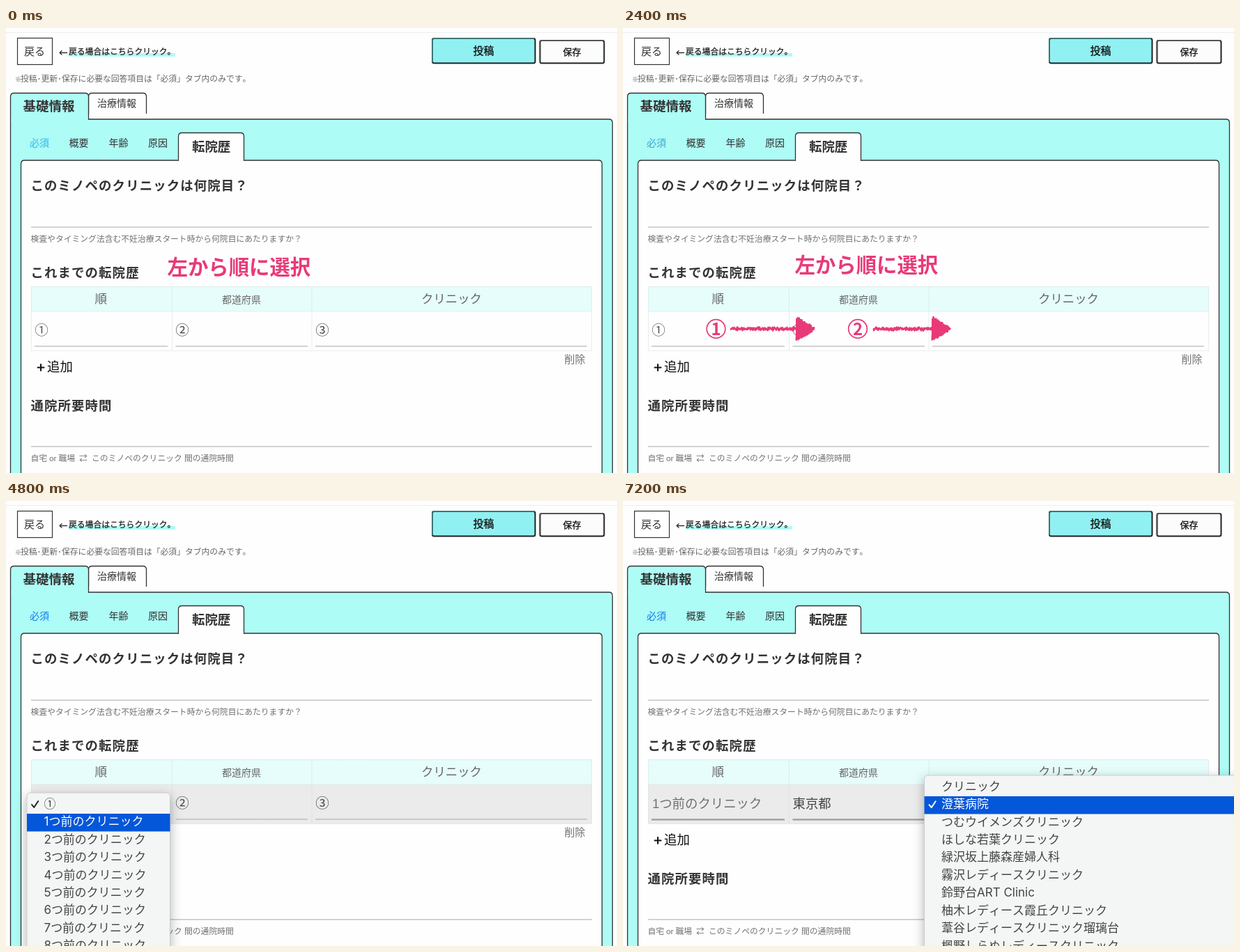
These frames come from a looping animation (877 by 639 pixels, 8000 ms). An HTML page:

```html
<!DOCTYPE html>
<html lang="ja">
<head>
<meta charset="utf-8">
<title>転院歴の入力</title>
<style>
html, body { margin: 0; width: 100%; height: 100%; overflow: hidden; background: #fefefe; }
svg { display: block; width: 877px; height: 639px; }
text {
  font-family: "Liberation Sans", "Noto Sans CJK JP", sans-serif;
  font-kerning: none; text-spacing-trim: space-all; white-space: pre;
}
.latin { font-family: Inter, sans-serif; }
</style>
</head>
<body>
<svg id="stage" viewBox="0 0 877 639">
  <defs>
    <filter id="shadow" x="-20%" y="-20%" width="140%" height="140%">
      <feDropShadow dx="0" dy="5" stdDeviation="8" flood-opacity=".3"/>
    </filter>
  </defs>
</svg>
<script>
const LOOP = 8000, STEP = 1200;
const CYAN = '#adfcf5', INK = '#333', GREY = '#707070', PINK = '#e83a78', BLUE = '#0457d9';

// Text is placed by its left edge and the middle of the em box.
const text = (x, cy, size, str, fill = INK, extra = '') =>
  `<text x="${x}" y="${(cy + size * .38).toFixed(2)}" font-size="${size}" fill="${fill}" ${extra}>${str}</text>`;
const medium = (x, cy, size, str, fill = INK) =>
  text(x, cy, size, str, fill, `stroke="${fill}" stroke-width=".3"`);
const bold = (x, cy, size, str, fill = INK, gap = 0) =>
  text(x, cy, size, str, fill, `font-weight="700" letter-spacing="${gap}"`);
const rect = (x, y, w, h, fill, extra = '') =>
  `<rect x="${x}" y="${y}" width="${w}" height="${h}" fill="${fill}" ${extra}/>`;
const path = (d, stroke, width = 1, fill = 'none') =>
  `<path d="${d}" stroke="${stroke}" stroke-width="${width}" fill="${fill}" stroke-linecap="round" stroke-linejoin="round"/>`;
const rule = (x1, x2, y, color = '#a8a8a8', width = 1) =>
  rect(x1, y - width / 2, x2 - x1, width, color);
// Visible from step a to step b, both included.
const during = (a, b, body) => `<g data-from="${a}" data-to="${b}">${body}</g>`;

const tab = (x1, x2, top, bottom, fill) =>
  path(`M${x1} ${bottom}V${top + 5}q0 -5 5 -5H${x2 - 5}q5 0 5 5V${bottom}`, INK, 1.3, fill);
const heading = (cy, str) => bold(35.5, cy, 18.4, str, INK, 1.13);

function button(x, y, w, h, fill, lit, label, lx, cy, size) {
  return rect(x + 1, y + 1, w - 2, h - 2, fill, 'rx="2.5" stroke="#1c2222" stroke-width="2"') +
    path(`M${x + 1} ${y + h - 3}V${y + 3}q0 -2 2 -2H${x + w - 3}`, lit, 2) +
    medium(lx, cy, size, label, '#111');
}

function noise(seed) {
  return () => {
    seed = (seed * 16807) % 2147483647;
    return seed / 2147483647 - .5;
  };
}

function arrow(tail, neck, y, seed) {
  const r = noise(seed);
  let shaft = `M${tail + 2} ${y}`, head = '';
  for (let x = tail + 3, side = 1; x < neck + 4; x += 1.5, side = -side)
    shaft += `L${(x + r() * 2).toFixed(1)} ${(y + side * (1.6 + r() * 2)).toFixed(1)}`;
  for (let i = 0, side = 1; i < 24; i++, side = -side) {
    const half = 16.5 * (1 - i / 25) + r() * 2.5;
    head += `${i ? 'L' : 'M'}${(neck + 2 + i * 1.1 + r()).toFixed(1)} ${(y + side * half).toFixed(1)}`;
  }
  const core = `M${neck + 2} ${y - 14}L${neck + 26} ${y}L${neck + 2} ${y + 14}Z`;
  return path(shaft, PINK, 2.6) + path(core, PINK, 2, PINK) + path(head, PINK, 2.6);
}

const badge = (n, cx, cy) =>
  `<circle cx="${cx}" cy="${cy}" r="13.3" fill="none" stroke="${PINK}" stroke-width="1.7"/>` +
  `<text x="${cx}" y="${cy + 8.8}" font-size="24" font-weight="700" text-anchor="middle" fill="${PINK}" ` +
  `style="font-family:'Noto Sans CJK JP',sans-serif">${n}</text>`;

function menu(x, top, w, first, items, picked, checked) {
  const gap = 25.42;
  let out = rect(x, top, w, 700 - top, '#f4f5f5',
    'rx="5" stroke="#bfc3c3" stroke-width=".8" filter="url(#shadow)"');
  out += rect(x, Math.round(first + picked * gap - 11.2), w, 25.5, BLUE);
  items.forEach((item, i) => {
    const color = i === picked ? '#fff' : '#444';
    const cy = first + i * gap;
    const label = item.replace(/[\w ]+/, s => `<tspan class="latin">${s}</tspan>`);
    out += text(x + 24.5, cy, 17, label, color);
    if (i === checked) out += path(`M${x + 7} ${cy + 1.5}l3.2 4l6 -9`, i === picked ? '#fff' : '#222', 2);
  });
  return out;
}

const orders = ['①', ...Array.from({ length: 8 }, (_, i) => `${i + 1}つ前のクリニック`)];
const prefectures = ('② 北海道 青森県 岩手県 宮城県 秋田県 山形県 福島県 茨城県 栃木県 ' +
  '群馬県 埼玉県 千葉県 東京都 神奈川県').split(' ');
const clinics = ['クリニック', '澄葉病院', 'つむウイメンズクリニック', 'ほしな若葉クリニック',
  '緑沢坂上藤森産婦人科', '霧沢レディースクリニック', '鈴野台ART Clinic',
  '柚木レディース霞丘クリニック', '葦谷レディースクリニック瑠璃台', '楓野しらぬレディースクリニック'];

const header =
  rule(0, 877, 6.5, '#eee') +
  rect(16.5, 14.5, 50, 38, '#fff', 'stroke="#333" stroke-width="1.2"') +
  text(26, 33.5, 15, '戻る') +
  path('M87.5 35.5H77M80 32.8L77 35.5L80 38.2', INK, 1.3) +
  rect(90, 36, 153, 5, CYAN) +
  medium(90, 33.5, 11.8, '戻る場合はこちらクリック。', '#222') +
  button(611, 14, 149.5, 37.5, '#91f0f1', '#3f7475', '投稿', 670.5, 32.5, 15) +
  button(765.5, 17, 94, 34.5, '#fcfcfc', '#555', '保存', 799.5, 34, 13) +
  bold(13, 73.5, 9, '※', '#555') +
  text(21, 73, 11.8, '投稿･更新･保存に必要な回答項目は「必須」タブ内のみです。', '#666');

const tabs =
  path('M6.5 645V131H865.5q5 0 5 5V645', INK, 1.3, CYAN) +
  tab(118.5, 201.5, 93.5, 122.5, '#fefefe') +
  tab(6.5, 118.5, 93.5, 131, CYAN) +
  rect(7.2, 129, 110.6, 5, CYAN) +
  bold(24.5, 112, 18.5, '基礎情報') +
  text(131, 108, 14, '治療情報') +
  during(0, 1, medium(34, 165, 14, '必須', '#4dc3ec')) +
  during(2, 3, text(34, 165, 14, '必須', '#3aa5cf')) +
  during(4, 6, text(34, 165, 14, '必須', '#0f7bea')) +
  text(90.5, 165, 14, '概要') + text(147.5, 165, 14, '年齢') + text(204, 165, 14, '原因') +
  path('M21.5 645V195q0 -5 5 -5H850.5q5 0 5 5V645', INK, 1.3, '#fefefe') +
  tab(247.5, 341.5, 150.5, 190, '#fefefe') +
  rect(248.2, 188, 92.6, 4, '#fefefe') +
  bold(267, 170, 18.4, '転院歴');

const form =
  heading(226, 'このミノペのクリニックは何院目？') +
  rule(36, 841, 286) +
  text(35.5, 302.5, 11.8, '検査やタイミング法含む不妊治療スタート時から何院目にあたりますか？', GREY) +
  heading(351, 'これまでの転院歴') +
  text(801.5, 475, 15, '削除', GREY) +
  path('M45.5 487.5h9M50 483v9', '#111', 2) +
  text(59, 486.5, 18.4, '追加', '#111') +
  heading(542, '通院所要時間') +
  rule(36, 841, 601) +
  [[35.5, '自宅'], [62, 'or'], [75.5, '職場'], [105, '⇄'], [123, 'このミノペのクリニック'], [256, '間の通院時間']]
    .map(([x, s]) => text(x, 618, 11.8, s, GREY)).join('');

const table =
  during(4, 6, rect(36, 407, 805, 56.5, '#ebebeb')) +
  rect(36, 371, 805, 36, '#e6fdfb') +
  `<g fill="none" stroke="#d3dddd" stroke-width="1" stroke-dasharray="1 1">
    <path d="M36.5 371.5H840.5V463.5H36.5ZM36.5 407H840.5M238.5 371.5V463.5M439 371.5V463.5"/></g>` +
  text(127.5, 388, 17.5, '順', '#666') +
  text(310, 390, 14, '都道府県', '#666') +
  text(596, 388, 17.4, 'クリニック', '#666') +
  during(0, 5, rule(41, 232, 457)) +
  during(0, 4, rule(243.5, 433, 457)) +
  during(6, 6, rule(41, 232, 457.5, '#a0a0a0', 2.4)) +
  during(5, 6, rule(243.5, 433, 457.5, '#a0a0a0', 2.4)) +
  rule(444, 834, 457) +
  during(0, 4, text(41.2, 434, 19.5, '①', '#555') + text(243.2, 434, 19.5, '②', '#444')) +
  during(5, 6, text(42, 434, 18.4, '1つ前のクリニック', GREY)) +
  during(6, 6, text(243.5, 434, 18.4, '東京都', '#444')) +
  text(444.2, 434, 19.5, '③', '#444');

const guide =
  during(0, 0, bold(231.5, 343, 29.4, '左から順に選択', PINK)) +
  during(1, 3, bold(246.5, 340, 29.4, '左から順に選択', PINK) + badge(1, 133.5, 432)) +
  during(1, 1, arrow(155, 239, 433, 11)) +
  during(2, 3, arrow(153, 247, 432, 23) + badge(2, 337, 432) + arrow(358, 442, 432, 37)) +
  during(3, 3, badge(3, 520, 429.5));

const menus =
  during(4, 4, menu(30, 419, 205.5, 434.5, orders, 1, 0)) +
  during(5, 5, menu(232, 252.5, 189.5, 268.5, prefectures, 13, 0)) +
  during(6, 6, menu(432.5, 394, 480, 409.3, clinics, 1, 1));

const stage = document.getElementById('stage');
stage.insertAdjacentHTML('beforeend', header + tabs + form + table + guide + menus);
const layers = [...stage.querySelectorAll('[data-from]')];

let shown = -1;
function draw() {
  const step = Math.floor((performance.now() % LOOP) / STEP);
  if (step !== shown) {
    shown = step;
    for (const el of layers)
      el.style.display = step >= +el.dataset.from && step <= +el.dataset.to ? '' : 'none';
  }
  requestAnimationFrame(draw);
}
draw();
</script>
</body>
</html>
```
